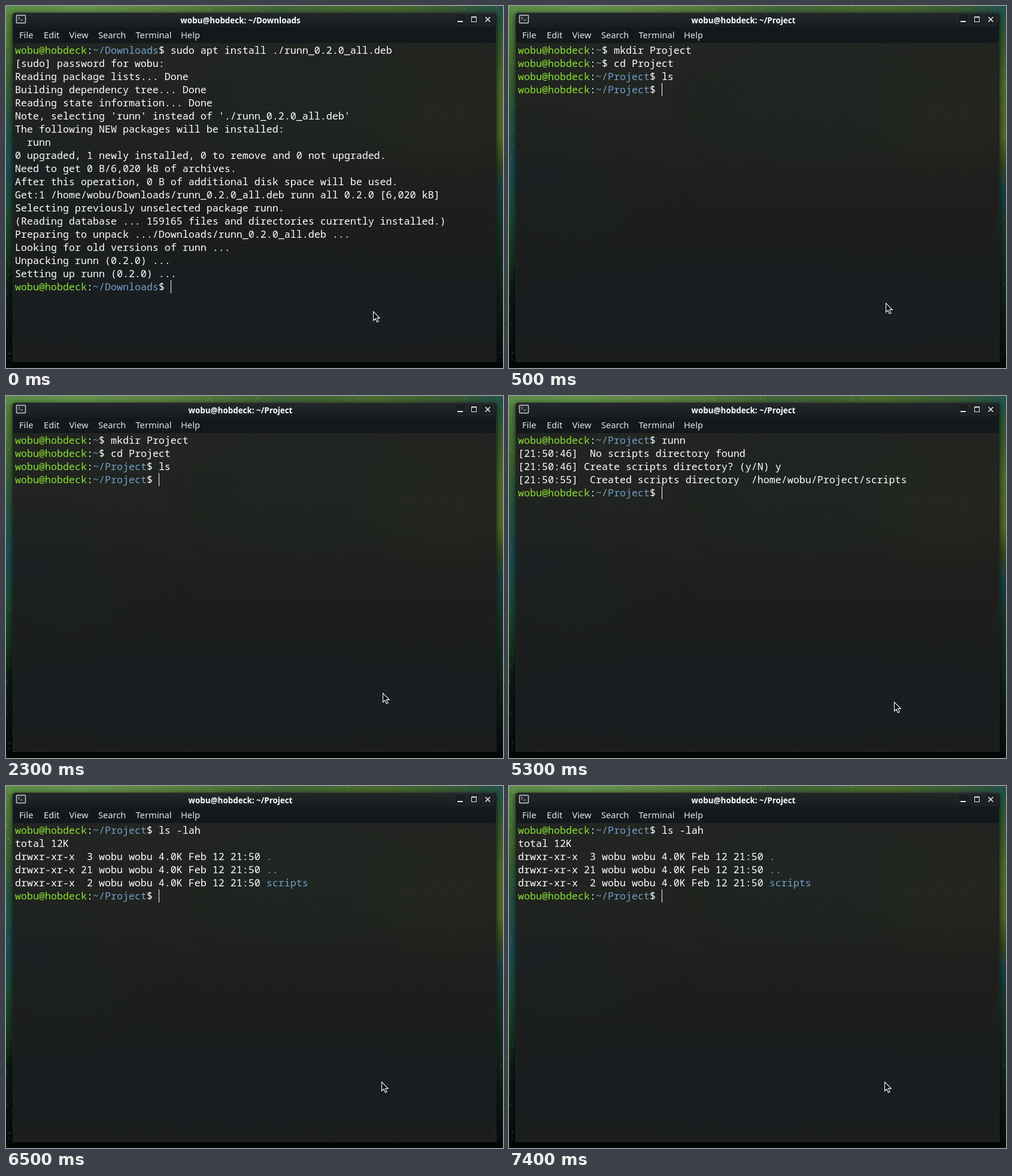
An HTML page for the animation above (8000 ms loop, 830x606 px).

```html
<!DOCTYPE html>
<html lang="en">
<head>
<meta charset="utf-8">
<title>Terminal session</title>
<style>
html, body { margin: 0; width: 100%; height: 100%; overflow: hidden; background: #07100c; }
svg { display: block; width: 830px; height: 606px; }
text { white-space: pre; fill: #fff; }
.mono { font: 16.667px "Noto Sans Mono", monospace; }
.menu { font: 14.667px "Noto Sans", sans-serif; fill: #e6e8e8; }
.title { font: bold 13.4px "Noto Sans", sans-serif; text-anchor: middle; }
.user { fill: #8ae234; }
.dir { fill: #729fcf; }
</style>
</head>
<body>
<svg viewBox="0 0 830 606">
  <defs>
    <linearGradient id="top">
      <stop offset="0" stop-color="#5a8a44"/><stop offset=".15" stop-color="#64934a"/>
      <stop offset=".35" stop-color="#5a7f3d"/><stop offset=".55" stop-color="#3f6638"/>
      <stop offset=".75" stop-color="#4a6a2e"/><stop offset=".9" stop-color="#3a5c34"/>
      <stop offset="1" stop-color="#22504a"/>
    </linearGradient>
    <linearGradient id="left" x2="0" y2="1">
      <stop offset="0" stop-color="#568640"/><stop offset=".18" stop-color="#3d652f"/>
      <stop offset=".3" stop-color="#265340"/><stop offset=".45" stop-color="#1b4a52"/>
      <stop offset=".56" stop-color="#1c4a36"/><stop offset=".7" stop-color="#14331d"/>
      <stop offset=".78" stop-color="#0a1a13"/><stop offset="1" stop-color="#040b09"/>
    </linearGradient>
    <linearGradient id="right" x2="0" y2="1">
      <stop offset="0" stop-color="#22504a"/><stop offset=".1" stop-color="#34582f"/>
      <stop offset=".22" stop-color="#4a682a"/><stop offset=".36" stop-color="#4f6628"/>
      <stop offset=".44" stop-color="#33461f"/><stop offset=".5" stop-color="#1b3e40"/>
      <stop offset=".6" stop-color="#17352b"/><stop offset=".75" stop-color="#12261a"/>
      <stop offset="1" stop-color="#050c0a"/>
    </linearGradient>
    <linearGradient id="bar" x2="0" y2="1">
      <stop offset="0" stop-color="#22272a"/><stop offset="1" stop-color="#181c1f"/>
    </linearGradient>
    <linearGradient id="pane" x2="0" y2="1">
      <stop offset="0" stop-color="#222521"/><stop offset=".3" stop-color="#20231f"/>
      <stop offset=".55" stop-color="#1d1e1c"/><stop offset=".72" stop-color="#1b1e1f"/>
      <stop offset=".88" stop-color="#1a1e21"/><stop offset="1" stop-color="#1c1d1c"/>
    </linearGradient>
    <filter id="soft" x="-60%" y="-100%" width="220%" height="300%" color-interpolation-filters="sRGB">
      <feGaussianBlur stdDeviation="32"/>
    </filter>
    <filter id="shade" color-interpolation-filters="sRGB"><feGaussianBlur stdDeviation="4"/></filter>
    <clipPath id="inner"><rect x="12" y="62" width="806" height="533"/></clipPath>
  </defs>

  <rect width="830" height="606" fill="#050b0a"/>
  <rect width="415" height="606" fill="url(#left)"/>
  <rect x="415" width="415" height="606" fill="url(#right)"/>
  <rect width="830" height="12" fill="url(#top)"/>
  <rect y="596" width="830" height="10" fill="#040908"/>
  <g id="stars"></g>
  <rect x="10" y="12" width="810" height="587" rx="6" opacity=".6" filter="url(#shade)"/>

  <path d="M11 596V17q0-6 6-6H813q6 0 6 6V596z" fill="#15191b"/>
  <path d="M12 36V17q0-5 5-5H813q5 0 5 5V36z" fill="url(#bar)"/>
  <path d="M16 11.5H814" stroke="#2c3234"/>
  <rect x="12" y="36" width="806" height="26" fill="#14181a"/>
  <g clip-path="url(#inner)">
    <rect x="12" y="62" width="806" height="533" fill="url(#pane)"/>
    <g filter="url(#soft)">
      <ellipse cx="520" cy="170" rx="180" ry="60" fill="#1f2723" opacity=".6"/>
      <ellipse cx="735" cy="180" rx="110" ry="65" fill="#272a21" opacity=".6"/>
      <ellipse cx="50" cy="285" rx="75" ry="42" fill="#192327" opacity=".7"/>
      <ellipse cx="110" cy="350" rx="130" ry="40" fill="#1c221f" opacity=".6"/>
      <ellipse cx="390" cy="500" rx="330" ry="55" fill="#191e22" opacity=".6"/>
    </g>
    <g id="specks"></g>
  </g>
  <path d="M11.5 36V595.5H818.5V36" fill="none" stroke="#222729"/>

  <g fill="none" stroke="#c9cccd">
    <rect x="17.5" y="15.5" width="15" height="13" rx="1" fill="#25292b" stroke-width="1.4"/>
    <path d="M20.5 18.5l2.5 2-2.5 2M24 23.5h4"/>
  </g>
  <g fill="#1b1f22" stroke="#262b2e">
    <rect x="749.5" y="13.5" width="18" height="18" rx="3"/>
    <rect x="772.5" y="13.5" width="18" height="18" rx="3"/>
    <rect x="795.5" y="13.5" width="18" height="18" rx="3"/>
  </g>
  <g fill="none" stroke="#e8eaea">
    <path d="M754 26h9" stroke-width="2"/>
    <rect x="777.5" y="18.5" width="8" height="8"/><path d="M777 18.5h9" stroke-width="2"/>
    <path d="M800.5 18.5l8 8m0-8l-8 8" stroke-width="1.7"/>
  </g>
  <text id="title" class="title" x="391.5" y="29"></text>
  <g id="menu"></g>
  <g id="screen"></g>
  <rect id="caret" width="1" height="22" fill="#fff"/>
  <path id="pointer" d="M.5 .5V15.5L4 12.3L6.4 18L9 16.9L6.6 11.4H11.2z" fill="#0b0d0d" stroke="#fff" stroke-width="1.1"/>
</svg>
<script>
const LOOP = 8000, CELL = 10, LINE = 22, LEFT = 15;
const USER = "wobu", HOST = "hobdeck";
const $ = id => document.getElementById(id);
const span = (cls, s) => `<tspan class="${cls}">${s}</tspan>`;
const dir = s => span("dir", s);
const prompt = (path, cmd = "") => `${span("user", USER + "@" + HOST)}:${dir(path)}$ ${cmd}`;
const entry = (links, name) => `drwxr-xr-x ${links} ${USER} ${USER} 4.0K Feb 12 21:50 ${dir(name)}`;

// Each scene ends with an empty prompt in its working directory.
const scenes = [
  { at: 0, path: "~/Downloads", pointer: [613, 511], lines: [
    prompt("~/Downloads", "sudo apt install ./runn_0.2.0_all.deb"),
    `[sudo] password for ${USER}:`,
    "Reading package lists... Done",
    "Building dependency tree... Done",
    "Reading state information... Done",
    "Note, selecting 'runn' instead of './runn_0.2.0_all.deb'",
    "The following NEW packages will be installed:",
    "  runn",
    "0 upgraded, 1 newly installed, 0 to remove and 0 not upgraded.",
    "Need to get 0 B/6,020 kB of archives.",
    "After this operation, 0 B of additional disk space will be used.",
    `Get:1 /home/${USER}/Downloads/runn_0.2.0_all.deb runn all 0.2.0 [6,020 kB]`,
    "Selecting previously unselected package runn.",
    "(Reading database ... 159165 files and directories currently installed.)",
    "Preparing to unpack .../Downloads/runn_0.2.0_all.deb ...",
    "Looking for old versions of runn ...",
    "Unpacking runn (0.2.0) ...",
    "Setting up runn (0.2.0) ..."
  ] },
  { at: 500, path: "~/Project", pointer: [629, 497], lines: [
    prompt("~", "mkdir Project"),
    prompt("~", "cd Project"),
    prompt("~/Project", "ls")
  ] },
  { at: 3500, path: "~/Project", pointer: [643, 512], lines: [
    prompt("~/Project", "runn"),
    "[21:50:46]  No scripts directory found",
    "[21:50:46] Create scripts directory? (y/N) y",
    `[21:50:55]  Created scripts directory  /home/${USER}/Project/scripts`
  ] },
  { at: 6500, path: "~/Project", pointer: [627, 495], lines: [
    prompt("~/Project", "ls -lah"),
    "total 12K",
    entry(" 3", "."),
    entry("21", ".."),
    entry(" 2", "scripts")
  ] }
];

function scatter(id, count, seed, spot, opacity) {
  const rnd = () => (seed = (seed * 16807) % 2147483647) / 2147483647;
  let out = "";
  for (let i = 0; i < count; i++) {
    const [x, y] = spot(rnd);
    out += `<circle cx="${x.toFixed(1)}" cy="${y.toFixed(1)}" r="${(.3 + rnd() * .5).toFixed(2)}"/>`;
  }
  $(id).innerHTML = `<g fill="#c8d8a8" opacity="${opacity}">${out}</g>`;
}
scatter("stars", 150, 91, r => {
  const side = r();
  if (side < .4) return [r() * 830, r() * 10];
  return [(side < .7 ? 0 : 820) + r() * 10, r() * 590];
}, .45);
scatter("specks", 55, 47, r => [12 + r() * 806, 62 + r() * 430], .13);

$("menu").innerHTML = [["File", 22], ["Edit", 63], ["View", 105.5], ["Search", 154], ["Terminal", 216.5], ["Help", 292]]
  .map(([s, x]) => `<text class="menu" x="${x}" y="54">${s}</text>`).join("");

let shown;
function draw(ms) {
  const scene = scenes.filter(s => s.at <= ms).pop();
  if (scene === shown) return;
  shown = scene;
  const { path, lines, pointer } = scene;
  $("title").textContent = `${USER}@${HOST}: ${path}`;
  $("screen").innerHTML = [...lines, prompt(path)]
    .map((s, i) => `<text class="mono" x="${LEFT}" y="${80 + i * LINE}">${s}</text>`).join("");
  const column = `${USER}@${HOST}:${path}$ `.length;
  $("caret").setAttribute("x", LEFT + column * CELL);
  $("caret").setAttribute("y", 63 + lines.length * LINE);
  $("pointer").setAttribute("transform", `translate(${pointer})`);
}

const start = performance.now();
function tick() {
  draw((performance.now() - start) % LOOP);
  requestAnimationFrame(tick);
}
tick();
</script>
</body>
</html>
```
